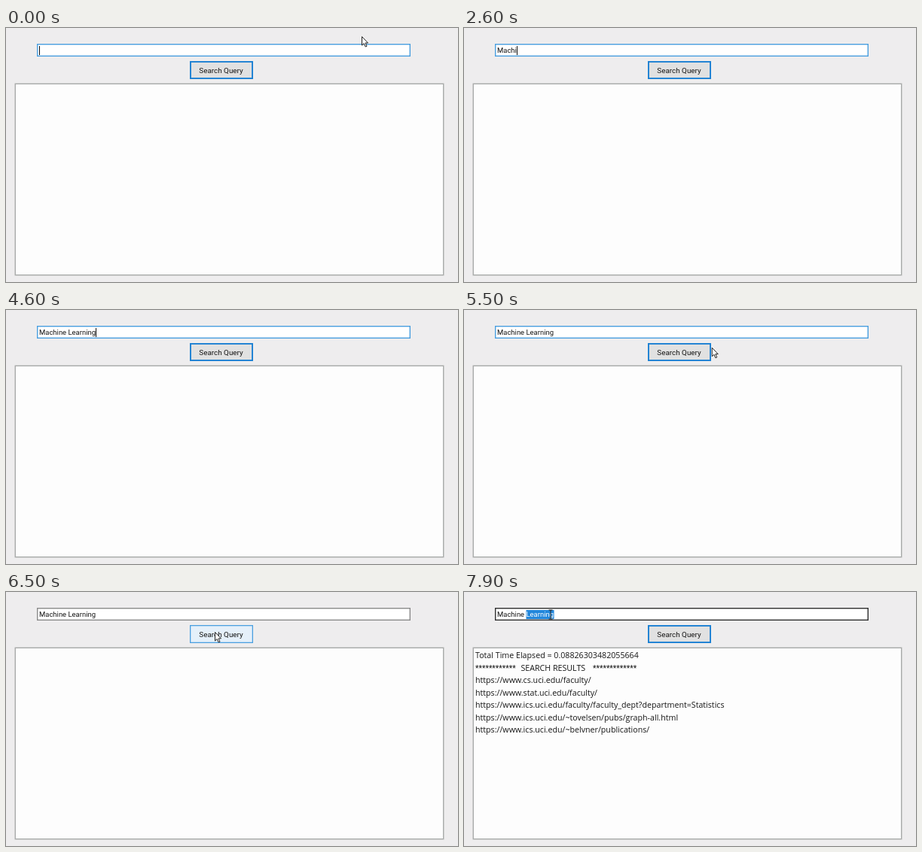
An HTML page with a canvas that plays this animation: 600 by 338 pixels, repeating every 8 s.

```html
<!DOCTYPE html>
<html lang="en">
<head>
<meta charset="utf-8">
<title>Search window</title>
<style>
  html, body { margin: 0; width: 100%; height: 100%; overflow: hidden; background: #eeedee; }
  canvas { display: block; width: 600px; height: 338px; }
</style>
</head>
<body>
<canvas width="600" height="338"></canvas>
<script>
const ctx = document.querySelector('canvas').getContext('2d');
const LOOP = 8000, STEP = 100;
const UI_FONT = '9.47px Roboto, sans-serif';
const RESULT_FONT = '10.66px "Open Sans", sans-serif';
const STAR_FONT = '10.4px Roboto, sans-serif';
const BLUE = '#1b80d3', SOFT_BLUE = '#4a9fdf';

// One key per entry, timed in steps; "<" is backspace.
const keys = 'Machine Lr<earning';
const keySteps = [22, 23, 24, 25, 26, 28, 30, 33, 34, 35, 37, 38, 39, 40, 42, 43, 44, 45];

const results = [
  'https://www.cs.uci.edu/faculty/',
  'https://www.stat.uci.edu/faculty/',
  'https://www.ics.uci.edu/faculty/faculty_dept?department=Statistics',
  'https://www.ics.uci.edu/~tovelsen/pubs/graph-all.html',
  'https://www.ics.uci.edu/~belvner/publications/'
];

const between = (value, from, to) => value >= from && value < to;

function box(x, y, w, h, fill, border, line = 1) {
  ctx.fillStyle = fill;
  ctx.fillRect(x, y, w, h);
  ctx.strokeStyle = border;
  ctx.lineWidth = line;
  ctx.strokeRect(x + line / 2, y + line / 2, w - line, h - line);
}

function write(text, x, y, font, color = '#161616') {
  ctx.font = font;
  ctx.fillStyle = color;
  ctx.fillText(text, x, y);
}

function typedText(step) {
  let text = '';
  keySteps.forEach((at, i) => {
    if (step >= at) text = keys[i] === '<' ? text.slice(0, -1) : text + keys[i];
  });
  return text;
}

function caretVisible(step) {
  return step < 62 && !between(step, 5, 10) && !between(step, 16, 21) && !between(step, 50, 56);
}

function pointerAt(step) {
  if (step < 1) return { x: 472, y: 11 };
  if (step < 2) return { x: 519, y: 21 };
  if (step < 52) return null;
  if (step < 74) {
    const rest = 1 - Math.min(1, (step - 51) / 8);
    return { x: 277 + 207 * rest * rest, y: 53 - 13 * rest * rest };
  }
  if (step < 75) return { x: 266, y: 40 };
  return { x: step < 76 ? 258 : step < 78 ? 252 : 115, y: 30, beam: true };
}

function drawField(step) {
  const border = step >= 75 ? '#303030' : step >= 62 ? '#8b8b8b' : SOFT_BLUE;
  box(41, 21, 496, 17, '#fff', border, 1.4);
  const text = typedText(step);
  write(text, 44, 33.4, UI_FONT);
  const end = 44 + ctx.measureText(text).width;
  if (step >= 79) {
    const start = 44 + ctx.measureText('Machine ').width;
    ctx.fillStyle = '#2287dc';
    ctx.fillRect(start, 24, end - start + 0.5, 12);
    write('Learning', start, 33.4, UI_FONT, '#fff');
  }
  if (caretVisible(step)) {
    ctx.fillStyle = '#111';
    ctx.fillRect(Math.round(end), 24, 1, 12);
  }
}

function drawButton(step, pointer) {
  const over = pointer && between(pointer.x, 244, 328) && between(pointer.y, 44, 68);
  const pressed = between(step, 62, 64);
  if (pressed) box(244, 44, 84, 24, '#cce4f7', '#2f75ae', 1.3);
  else if (over) box(244, 44, 84, 24, '#e5f0fa', SOFT_BLUE, 1.3);
  else box(244, 44, 84, 24, '#e1e1e1', BLUE, 1.9);
  ctx.textAlign = 'center';
  write('Search Query', 285.5, 59.7, '9.9px Roboto, sans-serif');
  ctx.textAlign = 'left';
}

function drawResults(step) {
  box(11.5, 73.5, 570, 256, '#fdfdfd', '#a9abaa', 1.5);
  if (step < 66) return;
  write('Total Time Elapsed = 0.08826303482055664', 15, 88, RESULT_FONT);
  write('*'.repeat(12), 15, 105, STAR_FONT);
  write('SEARCH RESULTS', 75.5, 104.5, RESULT_FONT);
  write('*'.repeat(13), 171, 105, STAR_FONT);
  results.forEach((url, i) => write(url, 15, 121 + i * 16.5, RESULT_FONT));
}

function drawPointer({ x, y, beam }) {
  ctx.save();
  ctx.translate(x, y);
  ctx.strokeStyle = '#222';
  ctx.lineWidth = 1;
  if (beam) {
    ctx.stroke(new Path2D('M-2.5 -6H2.5M0 -6V6M-2.5 6H2.5'));
  } else {
    const arrow = new Path2D('M.5 .5V12L3.2 9.5L5.2 14L7 13.2L5.1 8.9H8.5Z');
    ctx.fillStyle = '#fff';
    ctx.fill(arrow);
    ctx.stroke(arrow);
  }
  ctx.restore();
}

function draw(now) {
  const step = Math.floor((now % LOOP) / STEP);
  const pointer = pointerAt(step);
  ctx.fillStyle = '#eeedee';
  ctx.fillRect(0, 0, 600, 338);
  drawField(step);
  drawButton(step, pointer);
  drawResults(step);
  if (pointer) drawPointer(pointer);
}

let start;
function tick(now) {
  start ??= now;
  draw(now - start);
  requestAnimationFrame(tick);
}
requestAnimationFrame(tick);
</script>
</body>
</html>
```
